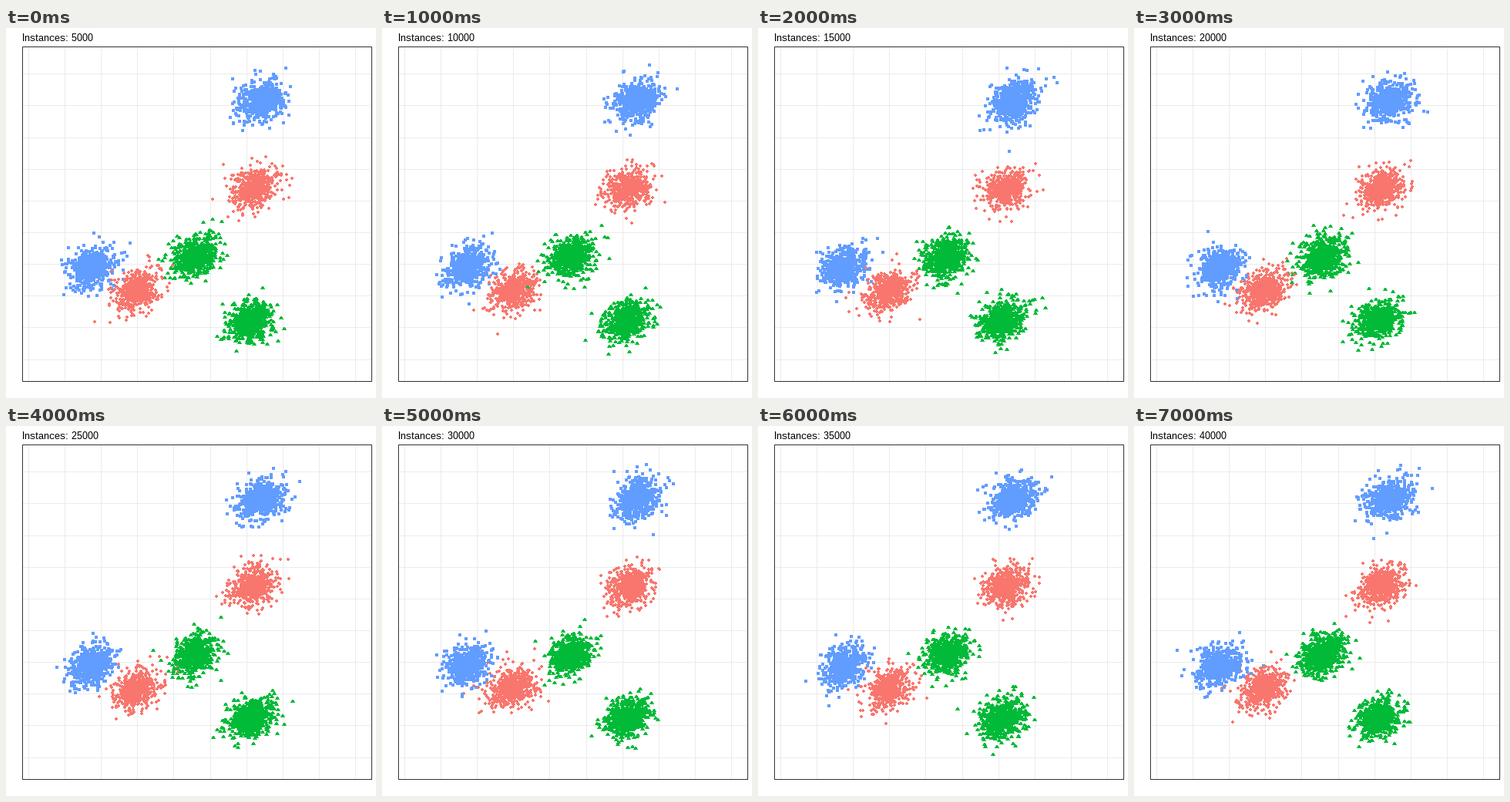
Animation, 480 px wide and 480 px high, one loop 8 s. Source, as a matplotlib script:

```python
import numpy as np
import matplotlib.pyplot as plt
from matplotlib.animation import FuncAnimation
from matplotlib.collections import PathCollection
from matplotlib.patches import Rectangle
from matplotlib.path import Path
from matplotlib.transforms import IdentityTransform

SIZE, DPI = 480, 80
PX = 72 / DPI  # one pixel in points
STEPS, STEP_MS, BATCH = 8, 1000, 5000
LEFT, TOP, RIGHT, BOTTOM = 21, 24, 474, 458

# Clusters cycle through blue squares, red dots and green triangles.
COLORS = ["#619CFF", "#F8766D", "#00BA38"]
CENTERS = np.array([(331, 95), (321, 208), (245, 297),
                    (111, 311), (169, 341), (317, 379)])
SPREAD = np.array([17, 15])
TILT = 0.25

plt.rcParams["text.hinting"] = "native"
plt.rcParams["text.hinting_factor"] = 1


def stack(*rows):
    """Symmetric marker from half-widths of pixel rows, bottom to top."""
    right = [(w, y - 2 + edge) for y, w in enumerate(rows) for edge in (0, 1)]
    left = [(-w, y) for w, y in reversed(right)]
    return Path([*right, *left, right[0]], closed=True)


MARKERS = [stack(2, 2, 2, 2), stack(1, 2, 2, 1), stack(2.5, 1.5, 1.5, 0.5)]


def sample(step):
    """One batch: uniform direction, half-normal distance from the centre."""
    rng = np.random.default_rng(40 + step)
    shape = BATCH // len(CENTERS), len(CENTERS)
    angle = rng.uniform(0, 2 * np.pi, shape)
    radius = np.abs(rng.normal(size=shape))
    u, v = radius * np.cos(angle), radius * np.sin(angle)
    # Screen y grows downwards, so an upward tilt is negative.
    v = -TILT * u + np.sqrt(1 - TILT**2) * v
    points = CENTERS + np.stack([u, v], axis=-1) * SPREAD
    return np.round(points).reshape(-1, 2)


fig = plt.figure(figsize=(SIZE / DPI, SIZE / DPI), dpi=DPI, facecolor="white")
ax = fig.add_axes([0, 0, 1, 1])
ax.set(xlim=(0, SIZE), ylim=(SIZE, 0))
ax.axis("off")

# Whole coordinates: one-pixel lines snap to the pixel they name.
grid = dict(color="#EBEBEB", lw=PX, zorder=1)
ax.vlines(np.round(29 + 47.12 * np.arange(10)), TOP, BOTTOM, **grid)
ax.hlines(np.round(59.3 + 41.14 * np.arange(10)), LEFT, RIGHT, **grid)
ax.add_patch(Rectangle((LEFT, TOP), RIGHT - LEFT, BOTTOM - TOP, fill=False,
                       ec="#333333", lw=PX, zorder=3))

cloud = PathCollection(MARKERS, facecolors=COLORS, edgecolors="none",
                       linewidths=0, antialiaseds=False, offsets=sample(0),
                       offset_transform=ax.transData, zorder=2)
cloud.set_transform(IdentityTransform())
cloud.set_snap(False)
ax.add_collection(cloud, autolim=False)

label = ax.text(21, 17, "", family="Liberation Sans", size=13 * PX,
                color="black", va="baseline")


def draw(step):
    cloud.set_offsets(sample(step))
    label.set_text(f"Instances: {BATCH * (step + 1)}")
    return cloud, label


anim = FuncAnimation(fig, draw, frames=STEPS, interval=STEP_MS, repeat=True,
                     repeat_delay=0)
plt.show()
```
